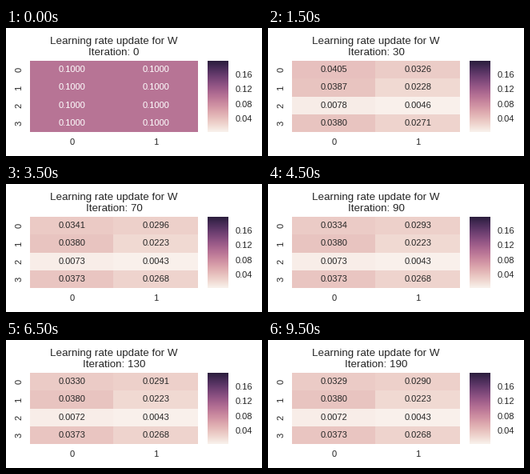
These frames come from a looping animation (320 by 160 pixels, 10000 ms). A matplotlib script:

```python
import matplotlib.pyplot as plt
import numpy as np
from matplotlib.animation import FuncAnimation
from matplotlib.colors import ListedColormap

WIDTH, HEIGHT, DPI = 320, 160, 80
FRAMES, INTERVAL, STEP = 20, 500, 10
LEFT, RIGHT, TOP, BOTTOM = 30, 240, 41, 130
BASE_RATE = 0.1
VMIN, VMAX = 0.0043, 0.1957
INK = "0.15"

# Learning rates of W after the first step and in the limit
FIRST = np.array([[0.0660, 0.0393], [0.0411, 0.0247], [0.0135, 0.0082], [0.0412, 0.0285]])
LIMIT = np.array([[0.0329, 0.0290], [0.0380, 0.0223], [0.007247, 0.0043], [0.0373, 0.02677]])
SETTLING = np.array([[0.0395], [0.072], [0.083], [0.083]])


def cubehelix_map(light=0.95, dark=0.15, rot=0.4, hue=0.8, count=256):
    x = np.linspace(light, dark, count)
    amp = hue * x * (1 - x) / 2
    phi = 2 * np.pi * rot * x
    weights = [(-0.14861, 1.78277), (-0.29227, -0.90649), (1.97294, 0.0)]
    channels = [x + amp * (p * np.cos(phi) + q * np.sin(phi)) for p, q in weights]
    return ListedColormap(np.clip(np.column_stack(channels), 0, 1))


def rates_at(iteration):
    """Adagrad style decay: the squared-gradient sum nears its limit exponentially."""
    if iteration == 0:
        return np.full_like(FIRST, BASE_RATE)
    first_sum, limit_sum = (BASE_RATE / FIRST) ** 2, (BASE_RATE / LIMIT) ** 2
    gap = (limit_sum - first_sum) * np.exp(-SETTLING * (iteration - STEP))
    return BASE_RATE / np.sqrt(limit_sum - gap)


plt.rcParams["font.family"] = "Liberation Sans"
plt.rcParams["text.kerning_factor"] = 6
fig = plt.figure(figsize=(WIDTH / DPI, HEIGHT / DPI), dpi=DPI, facecolor="white")
ax = fig.add_axes([0, 0, 1, 1])
cmap = cubehelix_map()


def label(x, y, text, size=10, ha="center", va="center", **kwargs):
    return ax.text(x, y, text, size=size, ha=ha, va=va, color=INK, **kwargs)


row_edges = np.round(np.linspace(TOP, BOTTOM, 5) + 0.1)
heat = ax.pcolormesh([LEFT, 134, RIGHT], row_edges, rates_at(0),
                     cmap=cmap, vmin=VMIN, vmax=VMAX)
ax.imshow(np.linspace(1, 0, BOTTOM - TOP)[:, None], cmap=cmap, aspect="auto",
          interpolation="nearest", extent=(252, 278, BOTTOM, TOP))
ax.set(xlim=(0, WIDTH), ylim=(HEIGHT, 0))
ax.axis("off")

col_x = LEFT + (np.arange(2) + 0.5) * (RIGHT - LEFT) / 2
row_y = TOP + (np.arange(4) + 0.5) * (BOTTOM - TOP) / 4
for i, x in enumerate(col_x):
    label(x, 146, str(i), va="baseline")
for i, y in enumerate(row_y):
    label(19.5, y, str(i), va="baseline", rotation=90, rotation_mode="anchor")
for tick in (0.04, 0.08, 0.12, 0.16):
    y = BOTTOM - (tick - VMIN) / (VMAX - VMIN) * (BOTTOM - TOP)
    label(287, y, f"{tick:.2f}", ha="left", va="center_baseline")

title = label((LEFT + RIGHT) / 2, 34.4, "", size=12, va="baseline", linespacing=1.3)
cells = [label(x, y, "") for y in row_y for x in col_x]


def update(frame):
    iteration = frame * STEP
    rates = rates_at(iteration)
    heat.set_array(rates)
    title.set_text(f"Learning rate update for W\nIteration: {iteration}")
    for cell, rate in zip(cells, rates.flat):
        cell.set_text(f"{rate:.4f}")
        cell.set_color("white" if rate > 0.08 else INK)
    return [heat, title, *cells]


anim = FuncAnimation(fig, update, frames=FRAMES, interval=INTERVAL,
                     repeat=True, repeat_delay=0, blit=False)
plt.show()
```
